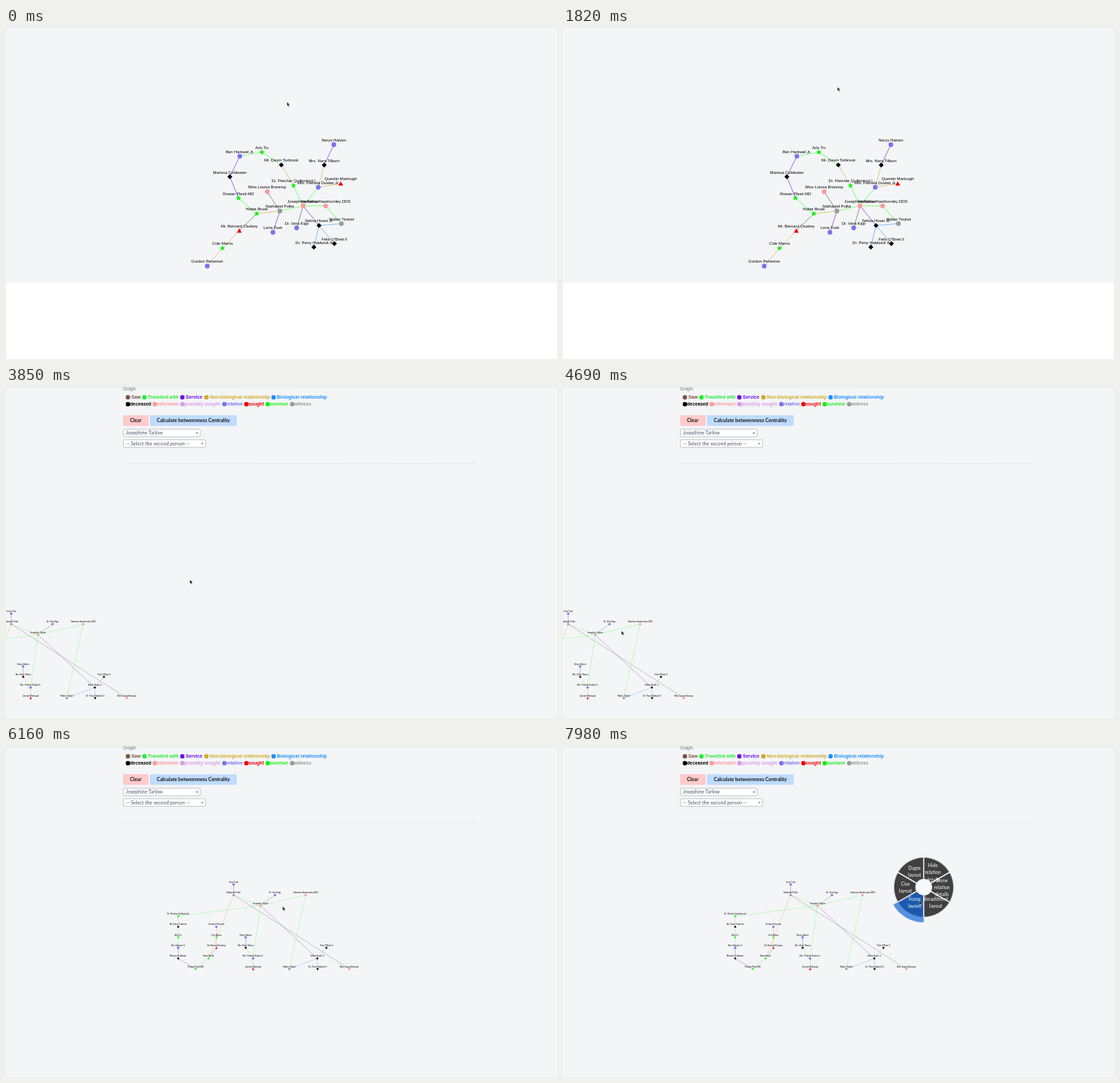
Write an HTML page that moves like this. It is 800 px wide and 481 px high and loops after 8 s.

```html
<!DOCTYPE html>
<html lang="en">
<head>
<meta charset="utf-8">
<title>Relationship graph</title>
<style>
html, body { margin: 0; width: 100%; height: 100%; overflow: hidden; background: #f4f5f7; }
svg { display: block; width: 100vw; height: 100vh; }
text { font-family: Lato, sans-serif; font-size: 7.15px; fill: #4b5563; }
.b { font-weight: 700; }
.legend, .legend text { font: 700 6.75px "Liberation Sans", Arial, sans-serif; }
.title { font-family: "Liberation Sans", Arial, sans-serif; font-size: 6.8px; fill: #777; }
.graph text { font: 5.9px "Liberation Sans", Arial, sans-serif; fill: #000; text-anchor: middle; }
.menu text { font-size: 6.9px; fill: #fff; text-anchor: middle; }
.box { fill: #fff; stroke: #8b9099; stroke-width: .7; }
#form .box { stroke: #a9adb3; }
.chev { fill: none; stroke: #6b7280; stroke-width: .8; }

#start, #page, #rawForm, #form, #tree, #grab, #menu, #hot { animation: 8s step-end infinite; }
#start { animation-name: start; }
#page { animation-name: page; }
#rawForm { animation-name: rawForm; }
#form { animation-name: form; }
#tree { animation-name: tree; }
#grab { animation-name: grab; }
#menu { animation-name: menu; }
#hot { animation-name: hot; }
#pan { animation: pan 8s linear infinite; }
#cursor { animation: cursor 8s linear infinite; }

@keyframes start { 0% { opacity: 1 } 32.375%, 100% { opacity: 0 } }
@keyframes page { 0% { opacity: 0 } 32.375%, 100% { opacity: 1 } }
@keyframes rawForm { 0% { opacity: 1 } 39.375%, 100% { opacity: 0 } }
@keyframes form { 0% { opacity: 0 } 39.375%, 100% { opacity: 1 } }
@keyframes tree { 0% { opacity: 0 } 43.75%, 100% { opacity: 1 } }
@keyframes grab { 0% { opacity: 0 } 62.125% { opacity: 1 } 73.5%, 100% { opacity: 0 } }
@keyframes menu { 0% { opacity: 0 } 96.25%, 100% { opacity: 1 } }
@keyframes hot { 0% { opacity: 0 } 98%, 100% { opacity: 1 } }
@keyframes pan {
  0%, 63% { transform: translate(-323px, 128px) }
  65.625% { transform: translate(-234px, 101px) }
  69% { transform: translate(-90px, 38px) }
  72.5%, 100% { transform: translate(0, 0) }
}
@keyframes cursor {
  0% { transform: translate(408px, 107.5px) }
  10% { transform: translate(401px, 64px) }
  17% { transform: translate(398px, 56px) }
  20.5% { transform: translate(398px, 60px) }
  22.75% { transform: translate(398.4px, 85.5px) }
  30%, 36% { transform: translate(403px, 96.5px) }
  46%, 49% { transform: translate(267px, 280px) }
  59%, 62.125% { transform: translate(78px, 357px) }
  65.625% { transform: translate(211.5px, 320px) }
  71.5%, 79% { transform: translate(401.6px, 233px) }
  91%, 96.5% { transform: translate(523.5px, 205px) }
  99%, 100% { transform: translate(517.5px, 225px) }
}
</style>
</head>
<body>
<svg viewBox="0 0 800 481" preserveAspectRatio="none">
  <rect width="800" height="481" fill="#f4f5f7"/>
  <g id="start">
    <rect y="370" width="800" height="111" fill="#fff"/>
    <g class="graph" id="web"></g>
  </g>
  <g id="page">
    <path d="M0 .3H800" stroke="#dcdde0" stroke-width=".6"/>
    <text class="title" x="170" y="4.8">Graph</text>
    <g class="legend" id="legend"></g>
    <rect x="170" y="41" width="37" height="15.5" rx="1" fill="#fecaca"/>
    <text class="b" x="180" y="51.2" style="fill:#111">Clear</text>
    <rect x="209" y="41" width="126" height="15.5" rx="1" fill="#bfdbfe"/>
    <text class="b" x="219" y="51.2" style="fill:#111">Calculate betweenness Centrality</text>
    <g id="rawForm">
      <rect class="box" x="170.4" y="61.2" width="111.6" height="24" rx="2"/>
      <text x="180.5" y="78.6">Josephine Tarlow</text>
      <path class="chev" d="M271 72l2 2 2-2"/>
      <rect class="box" x="170.4" y="89" width="119.4" height="24" rx="2"/>
      <text x="180.5" y="106.4">-- Select the second person --</text>
      <path class="chev" d="M279 100l2 2 2-2"/>
      <path d="M170 136.8H685" stroke="#e2e3e6" stroke-width=".6"/>
    </g>
    <g id="form">
      <rect class="box" x="170.4" y="61.3" width="111.6" height="11" rx="1.5"/>
      <text x="174" y="69.3">Josephine Tarlow</text>
      <path d="M275.2 66h4l-2 2.4z" fill="#888"/>
      <rect class="box" x="170.4" y="76.7" width="119.4" height="11" rx="1.5"/>
      <text x="174" y="84.7">-- Select the second person --</text>
      <path d="M283 81.4h4l-2 2.4z" fill="#888"/>
      <path d="M170 111.3H685" stroke="#dcdde0" stroke-width=".6"/>
    </g>
    <g id="tree">
      <g id="pan">
        <g class="graph" id="levels"></g>
        <circle id="grab" cx="401.3" cy="230.5" r="12.6" fill="#000" fill-opacity=".16"/>
      </g>
    </g>
    <g id="menu" class="menu"></g>
  </g>
  <path id="cursor" d="M0 0V6L1.4 4.8 2.4 7 3.4 6.5 2.5 4.4H4.3Z" stroke="#fff" stroke-width=".5"/>
</svg>
<script>
const $ = id => document.getElementById(id);

const kinds = {
  deceased: '#000', informant: '#f99a9a', 'possibly sought': '#da9be8',
  relative: '#7a73f0', sought: '#f00000', survivor: '#12f012', witness: '#999'
};
// label, legend colour, edge colour, edge width
const ties = {
  s: ['Saw', '#795548', '#5f4a44', .7], t: ['Travelled with', '#22ee33', '#7dff7d', 1.1],
  v: ['Service', '#6a11ee', '#6433d8', .8], n: ['Non-biological relationship', '#cfaa28', '#d3b04a', .8],
  b: ['Biological relationship', '#1e90ff', '#4ba3f5', .8]
};

// key: name, kind, force layout x y, level layout x y
const people = {
  a: ['Nerys Halven', 'relative', 476, 169.5, 348, 278],
  b: ['Arlo Tiv', 'survivor', 371.5, 180.5, 250, 278],
  c: ['Ben Harkwel Jr.', 'relative', 339.5, 186.3, 250, 293.3],
  d: ['Mr. Davin Torbrook', 'deceased', 399.7, 199, 250, 262.7],
  e: ['Mrs. Nora Tilburn', 'deceased', 462, 199.2, 348, 293.3],
  f: ['Marissa Coldwater', 'deceased', 325, 216.2, 250, 308.7],
  g: ['Dr. Fletcher Quillenford I', 'survivor', 417.4, 229, 250, 247.3],
  h: ['Mrs. Pamela Dusket Jr.', 'relative', 453.4, 231.5, 358.8, 308.7],
  i: ['Quentin Marlough', 'sought', 486, 226, 358.8, 324],
  j: ['Miss Louisa Brannop', 'informant', 379.3, 238, 498.5, 324],
  k: ['Rowan Plesk MD', 'survivor', 337.6, 247.2, 275.5, 324],
  l: ['Josephine Tarlow', 'informant', 431.3, 258.5, 369.4, 232],
  m: ['Valentina Hawthornley DDS', 'informant', 464, 258.6, 435, 216.6],
  n: ['Nathaniel Polke', 'witness', 397.7, 266, 330.5, 216.6],
  o: ['Hattie Brusk', 'survivor', 364.2, 269.8, 294, 308.7],
  p: ['Dr. Vera Kipp', 'relative', 422, 290.5, 390.5, 216.6],
  q: ['Selina Hovet Jr.', 'deceased', 454.5, 287, 452, 308.7],
  r: ['Walter Tindrel', 'witness', 487, 284.3, 411.3, 324],
  s: ['Mr. Bernard Cluskey', 'sought', 338.7, 294.3, 305.5, 293.3],
  t: ['Lena Tusk', 'relative', 387.5, 297, 330.5, 201.3],
  u: ["Felix O'Brett II", 'deceased', 476.8, 313.3, 465.2, 293.3],
  v: ['Dr. Perry Haldwick II', 'deceased', 447, 318.4, 452.4, 324],
  w: ['Cole Marns', 'survivor', 314.3, 320, 305.5, 278],
  x: ['Gordon Pelverton', 'relative', 292.2, 346, 305.5, 262.7]
};
// two people, then the tie between them
const edges = 'aev ehn hin hlt cbt bdt dgn glt cfv fkv kot onn oss swn wxn jns tnv nlt lps lqv lmt mrt qrb qvb qub'.split(' ');

const polar = (r, deg) => {
  const a = deg * Math.PI / 180;
  return [(r * Math.sin(a)).toFixed(2), (-r * Math.cos(a)).toFixed(2)];
};
const starPath = 'M' + Array.from({ length: 10 }, (_, i) => polar(i % 2 ? 2 : 3.9, i * 36)).join('L') + 'Z';

function shape(kind) {
  const fill = `fill="${kinds[kind]}"`;
  const path = {
    deceased: 'M0-3.6L3.6 0 0 3.6-3.6 0Z',
    sought: 'M0-3.3L3.5 3.1H-3.5Z',
    survivor: starPath
  }[kind];
  return path ? `<path d="${path}" ${fill}/>` : `<circle r="3.4" ${fill}/>`;
}

function drawGraph(id, col, scale) {
  const at = key => people[key].slice(col, col + 2);
  const lines = edges.map(([from, to, tie]) => {
    const [, , color, width] = ties[tie];
    return `<path d="M${at(from)}L${at(to)}" stroke="${color}" stroke-opacity=".9" stroke-width="${width * scale}"/>`;
  });
  const nodes = Object.keys(people).map(key => {
    const [name, kind] = people[key];
    return `<g transform="translate(${at(key)}) scale(${scale})">${shape(kind)}<text y="-4.6">${name}</text></g>`;
  });
  $(id).innerHTML = lines.concat(nodes).join('');
}

function legendRow(items, dots, gap, y) {
  return items.map(([label, color], i) =>
    `<circle cx="${dots[i]}" cy="${y}" r="3.2" fill="${color}"/>` +
    `<text x="${dots[i] + gap}" y="${y + 2.4}" style="fill:${color}">${label}</text>`).join('');
}

function sector(inner, outer, from, to, fill) {
  return `<path d="M${polar(inner, from)}L${polar(outer, from)}A${outer} ${outer} 0 0 1 ${polar(outer, to)}` +
    `L${polar(inner, to)}A${inner} ${inner} 0 0 0 ${polar(inner, from)}" fill="${fill}"/>`;
}

function drawMenu() {
  const labels = [
    ['Hide relation details', 13.3, -29.3], ['Show relation details', 26.5, -7.5],
    ['Breadthfirst layout', 17.5, 19.7], ['Fcose layout', -13, 19.7],
    ['Cise layout', -26.5, -2.5], ['Dagre layout', -13.3, -25.5]
  ];
  let out = '<g transform="translate(523.7 205.2)">';
  for (let i = 0; i < 6; i++) out += sector(12, 43, i * 60, i * 60 + 60, '#404040');
  out += '<g id="hot">' + sector(43, 51, 180, 240, '#5590e0') + sector(8, 43, 180, 240, '#1c59ad') + '</g>';
  for (let i = 0; i < 6; i++)
    out += `<path d="M${polar(11, i * 60)}L${polar(43.4, i * 60)}" stroke="#f4f5f7" stroke-width="1.6"/>`;
  out += '<circle r="11.8" fill="#f8f9fa"/>';
  for (const [label, x, y] of labels)
    label.split(' ').forEach((word, i) => out += `<text x="${x}" y="${y + i * 10.3}">${word}</text>`);
  return out + '</g>';
}

drawGraph('web', 2, 1);
drawGraph('levels', 4, .5);
$('legend').innerHTML =
  legendRow(Object.values(ties), [177, 201, 256, 291, 388.5], 5, 15) +
  legendRow(Object.entries(kinds), [177, 216, 256, 317, 349, 380, 415.5], 3, 25);
$('menu').innerHTML = drawMenu();
</script>
</body>
</html>
```
